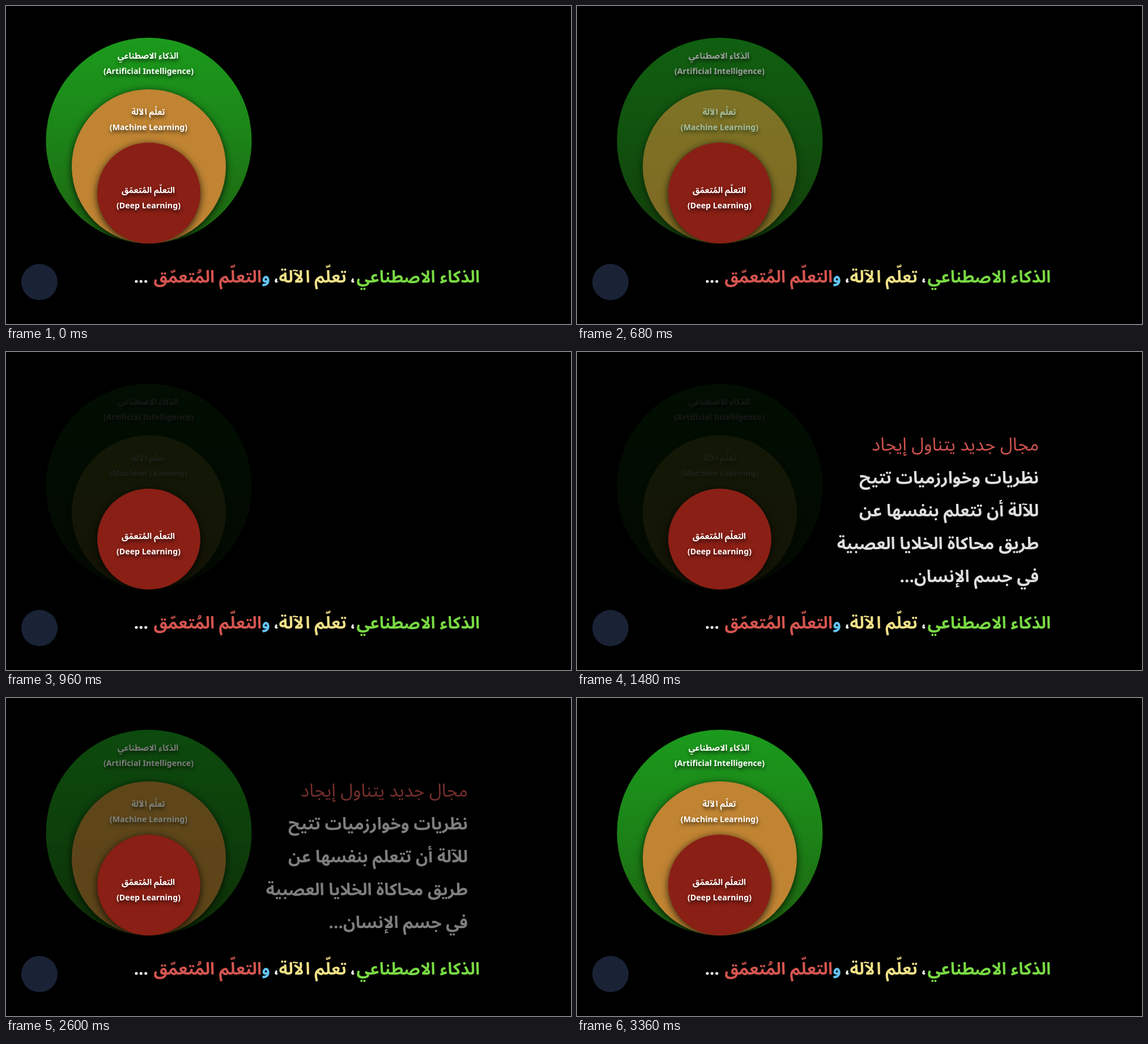
An HTML page for the animation above (3400 ms loop, 997 by 561 pixels).

```html
<!DOCTYPE html>
<html lang="ar">
<head>
<meta charset="utf-8">
<title>الذكاء الاصطناعي</title>
<style>
  html, body { margin: 0; width: 100%; height: 100%; overflow: hidden; background: #000; }
  svg { display: block; width: 997px; height: 561px; }
  text { font: bold 100px "Noto Sans Arabic", "Noto Sans", "DejaVu Sans", sans-serif; fill: #fff; }
  .title, .body, .lead { direction: rtl; text-anchor: start; }
  .label, .latin { text-anchor: middle; filter: drop-shadow(1px 4px 3px #000a); }
  .label { direction: rtl; }
  text.latin { font-family: "Noto Sans", "Open Sans", sans-serif; font-size: 14.2px; }
  .body { fill: #dedede; }
  .lead { font-weight: normal; fill: #d0544f; }
  .disc { filter: drop-shadow(0 3px 7px #000c); }
</style>
</head>
<body>
<svg viewBox="0 0 997 561">
  <defs>
    <linearGradient id="green" x2="0" y2="1">
      <stop stop-color="#1b9a1c"/>
      <stop offset=".5" stop-color="#1c8318"/>
      <stop offset="1" stop-color="#1e610f"/>
    </linearGradient>
  </defs>

  <g id="diagram">
    <g class="outer">
      <circle cx="252" cy="237.5" r="181.5" fill="url(#green)"/>
      <text class="label" x="250.5" y="93">الذكاء الاصطناعي</text>
      <text class="latin" x="251.5" y="119.5">(Artificial Intelligence)</text>
    </g>
    <g class="outer">
      <circle class="disc" cx="252" cy="283" r="136" fill="#c08433"/>
      <text class="label" x="251" y="192">تعلّم الآلة</text>
      <text class="latin" x="251.5" y="219">(Machine Learning)</text>
    </g>
    <g>
      <ellipse class="disc" cx="252" cy="330" rx="91" ry="89" fill="#8a1f15"/>
      <text class="label" x="251" y="330">التعلّم المُتعمّق</text>
      <text class="latin" x="251.5" y="356.5">(Deep Learning)</text>
    </g>
  </g>

  <g id="note">
    <text class="lead" x="815" y="174">مجال جديد يتناول إيجاد</text>
    <text class="body" x="815" y="232">نظريات وخوارزميات تتيح</text>
    <text class="body" x="815" y="290">للآلة أن تتعلم بنفسها عن</text>
    <text class="body" x="815" y="348">طريق محاكاة الخلايا العصبية</text>
    <text class="body" x="815" y="406">في جسم الإنسان...</text>
  </g>

  <text class="title" x="836" y="488" style="fill:#78d943">الذكاء الاصطناعي</text>
  <text class="title" x="617" y="488">،</text>
  <text class="title" x="601" y="488" style="fill:#f0e087">تعلّم الآلة</text>
  <text class="title" x="482" y="488">،</text>
  <text class="title" x="466" y="488" style="fill:#62c4f3">و</text>
  <text class="title" x="451" y="488" style="fill:#d45550">التعلّم المُتعمّق</text>
  <text class="title" x="251" y="488">...</text>

  <circle cx="59" cy="487" r="32" fill="#1a2236"/>
</svg>
<script>
  const FRAME = 40, LOOP = 3400;
  const diagram = document.getElementById('diagram');
  const note = document.getElementById('note');

  // One font size per text style, whichever Arabic font is installed.
  function setSize(style, total) {
    const texts = [...document.querySelectorAll('.' + style)];
    const length = texts.reduce((sum, el) => sum + el.getComputedTextLength(), 0);
    texts.forEach(el => el.style.fontSize = 100 * total / length + 'px');
  }
  setSize('title', 587);
  setSize('label', 261);
  setSize('body', 1236);
  setSize('lead', 295);

  const outer = diagram.querySelectorAll('.outer');
  const fresh = diagram.cloneNode(true);
  fresh.removeAttribute('id');
  diagram.after(fresh);

  // Progress from 0 to 1 in whole frames.
  const progress = (t, start, frames) =>
    Math.min(1, Math.max(0, (Math.floor((t - start) / FRAME) + 1) / frames));

  function draw(now) {
    const t = now % LOOP;
    const dim = 1 - 0.91 * progress(t, 520, 12);
    const dissolve = 0.5 - 0.5 * Math.cos(Math.PI * progress(t, 2000, 35));
    outer.forEach(el => el.style.opacity = dim);
    fresh.style.opacity = dissolve;
    note.style.opacity = t < 1480 ? 0 : 1 - dissolve;
  }

  const start = performance.now();
  function tick() {
    draw(performance.now() - start);
    requestAnimationFrame(tick);
  }
  tick();
</script>
</body>
</html>
```
